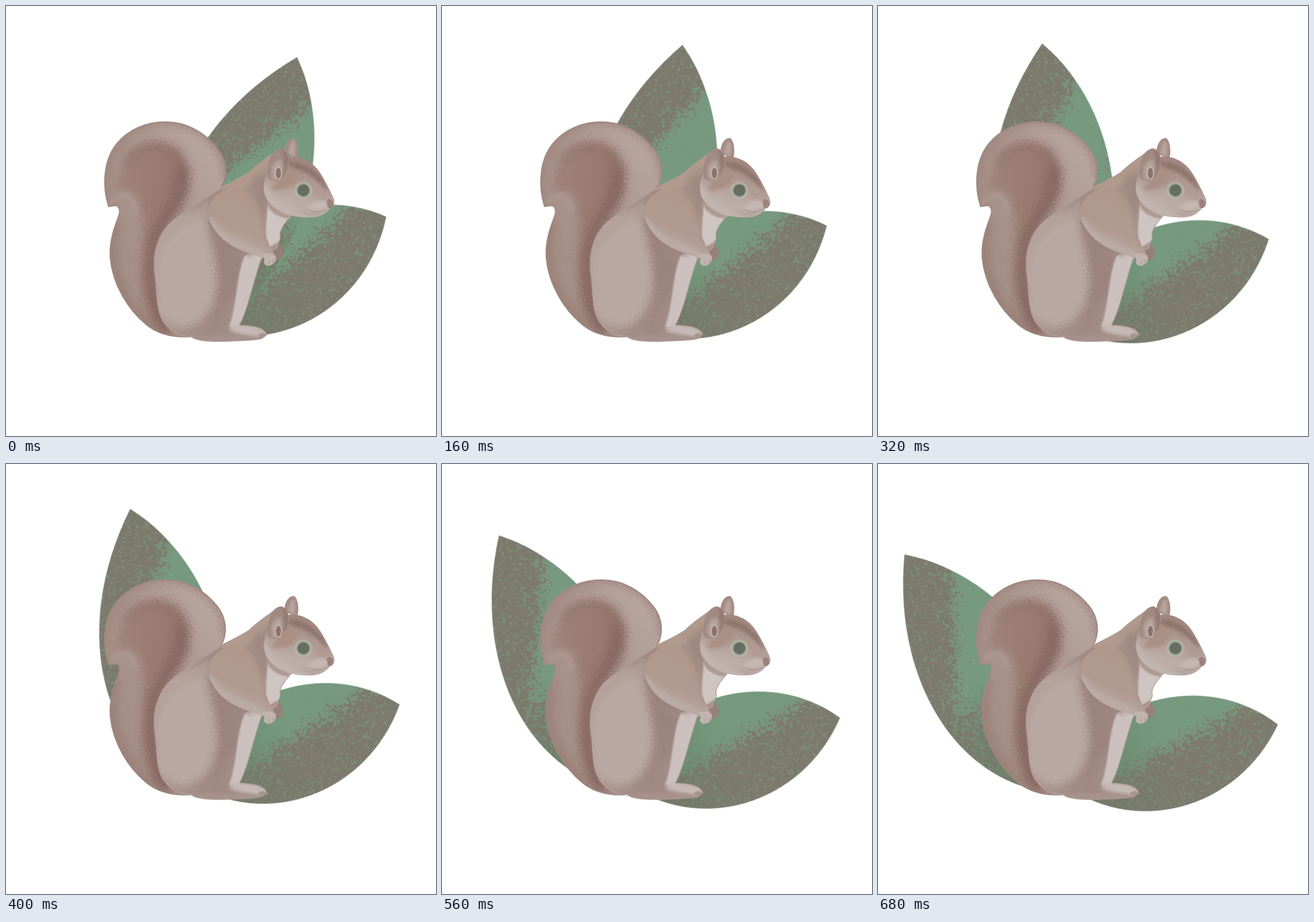
Write an HTML page with a canvas that moves like this. It is 700 px wide and 700 px high and loops after 1920 ms.

```html
<!DOCTYPE html>
<html lang="en">
<head>
<meta charset="utf-8">
<title>Squirrel and leaves</title>
<style>
  html, body { margin: 0; width: 100%; height: 100%; overflow: hidden; background: #fff; }
  #stage { position: relative; width: 700px; height: 700px; overflow: hidden; }
  canvas, svg { position: absolute; will-change: transform; }
  svg { left: 0; top: 0; }
  .edge { stroke-width: 2.4; stroke-linejoin: round; }
</style>
</head>
<body>
<div id="stage">
<svg width="700" height="700" viewBox="0 0 700 700">
  <defs>
    <!-- blur, then scatter the soft edge into stipple -->
    <filter id="grain" filterUnits="userSpaceOnUse" x="130" y="160" width="440" height="420" color-interpolation-filters="sRGB">
      <feGaussianBlur stdDeviation="6" result="b"/>
      <feTurbulence type="fractalNoise" baseFrequency=".6" numOctaves="2" seed="4"/>
      <feDisplacementMap in="b" scale="34" xChannelSelector="R" yChannelSelector="G"/>
    </filter>
    <filter id="fine" filterUnits="userSpaceOnUse" x="130" y="160" width="440" height="420" color-interpolation-filters="sRGB">
      <feGaussianBlur stdDeviation="2.5" result="b"/>
      <feTurbulence type="fractalNoise" baseFrequency=".6" numOctaves="2" seed="9"/>
      <feDisplacementMap in="b" scale="9" xChannelSelector="R" yChannelSelector="G"/>
    </filter>
    <filter id="soft" filterUnits="userSpaceOnUse" x="130" y="160" width="440" height="420">
      <feGaussianBlur stdDeviation=".8"/>
    </filter>
    <linearGradient id="tailFill" gradientUnits="userSpaceOnUse" x1="165" y1="350" x2="345" y2="240">
      <stop offset="0" stop-color="#a58f87"/><stop offset=".55" stop-color="#ac978f"/><stop offset="1" stop-color="#b8a7a0"/>
    </linearGradient>
    <linearGradient id="coreFill" gradientUnits="userSpaceOnUse" x1="195" y1="290" x2="300" y2="310">
      <stop offset="0" stop-color="#9d8077"/><stop offset=".55" stop-color="#997a71"/><stop offset="1" stop-color="#896b65"/>
    </linearGradient>
    <linearGradient id="bodyFill" gradientUnits="userSpaceOnUse" x1="270" y1="430" x2="400" y2="440">
      <stop offset="0" stop-color="#a8938c"/><stop offset=".6" stop-color="#9e8881"/><stop offset="1" stop-color="#a8938c"/>
    </linearGradient>
    <linearGradient id="armFill" gradientUnits="userSpaceOnUse" x1="385" y1="300" x2="350" y2="385">
      <stop offset="0" stop-color="#b0978a"/><stop offset=".65" stop-color="#b09a90"/><stop offset="1" stop-color="#b7a69f"/>
    </linearGradient>
    <linearGradient id="headFill" gradientUnits="userSpaceOnUse" x1="490" y1="252" x2="465" y2="343">
      <stop offset="0" stop-color="#a1877e"/><stop offset=".42" stop-color="#b19b92"/><stop offset=".75" stop-color="#bcaea8"/><stop offset="1" stop-color="#b9aaa5"/>
    </linearGradient>
    <path id="tail" d="M167 326C156 290 160 250 180 225C199 201 228 189 260 189C292 189 322 204 344 232C358 250 362 276 349 297L300 420V538C270 540 245 532 228 518C200 495 174 455 170 410C168 380 179 355 184 341C187 330 183 323 175 325Z"/>
    <path id="body" d="M446 233C425 247 407 260 396 271C380 282 366 287 350 296C318 319 283 338 264 357C246 377 240 405 242 430C248 470 243 490 256 513C268 530 284 538 302 538C312 546 345 546 365 545C390 544 408 543 416 541L424 535C419 524 405 521 379 520C393 495 400 455 415 411L440 394L446 377C443 366 452 354 464 341Z"/>
    <path id="arm" d="M331 326C340 302 365 292 388 298C405 308 414 331 418 356C420 372 427 383 430 392L437 405C429 412 417 411 405 405C380 398 352 386 337 360C329 346 328 336 331 326Z"/>
    <path id="head" d="M452 248C476 242 495 253 505 265C516 278 525 298 532 313C535 320 533 327 527 328C521 336 512 344 490 343C465 343 441 336 428 318C419 305 419 290 425 275C430 262 438 252 452 248Z"/>
    <path id="ear" d="M427 279C424 256 434 234 448 233C459 236 462 251 457 266C450 282 437 288 427 279Z"/>
    <clipPath id="inTail"><use href="#tail"/></clipPath>
    <clipPath id="inBody"><use href="#body"/></clipPath>
    <clipPath id="inArm"><use href="#arm"/></clipPath>
    <clipPath id="inHead"><use href="#head"/></clipPath>
    <clipPath id="inEar"><use href="#ear"/></clipPath>
  </defs>

  <!-- tail -->
  <use href="#tail" class="edge" fill="url(#tailFill)" stroke="#a28b83"/>
  <g clip-path="url(#inTail)">
    <path filter="url(#grain)" fill="none" stroke="#a0877f" stroke-width="14" d="M160 320C154 260 180 190 260 185C310 185 362 225 360 282"/>
    <path filter="url(#grain)" fill="none" stroke="#9b8279" stroke-width="22" d="M177 350C160 400 170 470 240 532"/>
    <path filter="url(#grain)" fill="url(#coreFill)" d="M182 305C180 255 205 222 250 221C288 224 303 258 296 300C290 328 268 344 256 366C242 400 240 470 268 540C226 516 218 460 222 410C225 360 225 335 211 306C204 298 190 298 182 305Z"/>
    <path filter="url(#grain)" fill="none" stroke="#886963" stroke-width="17" d="M286 262C294 310 258 340 243 378C228 430 238 480 262 530"/>
    <path filter="url(#grain)" fill="none" stroke="#8e716a" stroke-width="10" opacity=".75" d="M195 252C210 226 260 218 283 252"/>
    <path filter="url(#fine)" fill="none" stroke="#b2a098" stroke-width="10" opacity=".4" d="M172 319C190 300 208 308 212 336"/>
  </g>

  <!-- far paw -->
  <path fill="#978079" d="M432 390C440 380 450 391 451 402C450 412 445 415 438 414Z"/>

  <!-- body -->
  <use href="#body" class="edge" fill="url(#bodyFill)" stroke="#ae9a92"/>
  <g clip-path="url(#inBody)">
    <path filter="url(#fine)" fill="#b19a8d" d="M450 228L345 298L380 305L430 270Z"/>
    <path filter="url(#grain)" fill="#9e877f" d="M400 282L432 262L428 330L415 345Z"/>
    <path filter="url(#grain)" fill="#957d7680" d="M330 345C340 390 365 405 390 407L380 460L350 500C350 460 350 400 325 360Z"/>
    <path filter="url(#grain)" fill="#b8a8a1" d="M262 350C300 332 322 330 327 350C331 385 345 415 343 455C338 497 318 522 288 524C262 520 246 510 240 480C246 450 230 410 240 392Z"/>
    <path filter="url(#fine)" fill="#b2a098" opacity=".7" d="M242 390C260 350 300 338 330 316L330 345C290 350 255 380 243 430Z"/>
    <path filter="url(#soft)" fill="#cec4c1" d="M426 322C438 336 450 341 466 338L450 365L450 380L428 393C419 375 425 350 426 322Z"/>
    <path filter="url(#soft)" fill="#ad9990" d="M425 318C435 331 450 338 464 341L459 346C444 344 434 338 427 328Z"/>
    <path filter="url(#soft)" fill="#cbc0bd" d="M389 406C396 402 407 403 420 406C406 455 400 492 380 524L363 522C376 492 375 433 389 406Z"/>
    <path filter="url(#fine)" fill="#c5b9b5" d="M364 522C380 516 416 519 426 534L416 540C400 536 383 536 365 528Z"/>
    <path filter="url(#fine)" fill="#a6928c" d="M300 540C330 530 390 540 421 540L414 548H310Z"/>
  </g>
  <path fill="#a8948f" d="M412 534C417 531 422 533 424 536L415 541C411 540 410 537 412 534Z"/>

  <!-- arm -->
  <path filter="url(#fine)" fill="none" stroke="#8f766f" stroke-width="4" opacity=".5" d="M332 352C345 385 370 398 402 407"/>
  <use href="#arm" fill="url(#armFill)"/>
  <g clip-path="url(#inArm)">
    <path filter="url(#fine)" fill="none" stroke="#b9aaa4" stroke-width="16" d="M328 346C343 382 390 391 420 409"/>
    <path filter="url(#fine)" fill="none" stroke="#a38a80" stroke-width="6" opacity=".45" d="M391 298C413 315 416 350 430 390"/>
  </g>
  <path fill="#c1b4af" d="M417 406C422 401 434 402 439 407C441 414 437 421 428 423C421 423 418 418 421 412Z"/>
  <path fill="none" stroke="#aa9791" stroke-width="1" d="M430 414L427 421M436 412L434 419"/>

  <!-- far ear -->
  <path class="edge" fill="#a58d85" stroke="#a58d85" d="M454 239C455 224 461 216 469 216C475 222 476 238 473 248Z"/>
  <path filter="url(#soft)" fill="#b4a29b" d="M460 240C460 229 464 221 469 220C472 229 471 239 469 246Z"/>

  <!-- head -->
  <use href="#head" class="edge" fill="url(#headFill)" stroke="url(#headFill)"/>
  <g clip-path="url(#inHead)">
    <path filter="url(#fine)" fill="#8d746c" d="M456 254C480 251 500 264 514 280L524 302C508 290 500 275 484 269C471 264 463 263 456 254Z"/>
    <path filter="url(#fine)" fill="#a98f84" d="M454 267C474 264 480 278 468 290C456 300 440 302 432 298Z"/>
    <path filter="url(#fine)" fill="#c0b4af" d="M420 284C430 310 448 326 478 329C487 338 500 343 490 350C450 350 420 330 415 300Z"/>
    <path filter="url(#fine)" fill="#b09a91" d="M497 280C512 290 522 303 525 315L505 315Z"/>
    <path filter="url(#fine)" fill="#c4b8b3" d="M497 322C508 314 522 315 524 324C522 331 511 333 499 333C488 337 489 330 497 322Z"/>
    <path filter="url(#fine)" fill="#a68f87" opacity=".4" d="M465 328C480 334 497 339 514 334L510 340C490 342 475 338 465 328Z"/>
  </g>
  <path fill="none" stroke="#a48e87" stroke-width="1.2" d="M522 331C513 336 502 336 492 331"/>
  <path fill="#9b827b" d="M522 318C525 312 530 313 533 321C533 328 528 331 524 328Z"/>
  <circle cx="484" cy="300" r="13.6" fill="#b9b9ad" filter="url(#soft)"/>
  <circle cx="484" cy="300" r="11.4" fill="#8ea48f"/>
  <circle cx="484.3" cy="300" r="9.6" fill="#686d61"/>

  <!-- near ear -->
  <use href="#ear" class="edge" fill="#a18a81" stroke="#a18a81"/>
  <g clip-path="url(#inEar)">
    <path filter="url(#fine)" fill="#8e756e" d="M448 230C465 235 462 260 453 278C453 260 456 244 448 230Z"/>
    <path filter="url(#fine)" fill="#b8a69e" d="M434 280C430 263 436 252 447 251C453 261 449 279 439 284Z"/>
  </g>
  <ellipse cx="443.5" cy="272" rx="6" ry="10.5" fill="#c4b8b2"/>
  <ellipse cx="443.5" cy="272" rx="4.2" ry="8.7" fill="#8c716b"/>
</svg>
</div>
<script>
const GREEN = [119, 154, 127], DEEP = [103, 136, 108], BROWN = [125, 122, 109], MOSS = [115, 121, 104];

const mix = (a, b, t) => a + (b - a) * t;
const smooth = (lo, hi, x) => {
  const t = Math.min(1, Math.max(0, (x - lo) / (hi - lo)));
  return t * t * (3 - 2 * t);
};
const hash = (x, y) => {
  let h = Math.imul(x + 57, 374761393) ^ Math.imul(y + 131, 668265263);
  h = Math.imul(h ^ h >>> 13, 1274126177);
  return ((h ^ h >>> 16) >>> 0) / 2 ** 32;
};
const noise = (x, y) => {
  const i = Math.floor(x), j = Math.floor(y), u = smooth(0, 1, x - i), v = smooth(0, 1, y - j);
  return mix(mix(hash(i, j), hash(i + 1, j), u), mix(hash(i, j + 1), hash(i + 1, j + 1), u), v);
};

// Leaf stands upright: tip at the top centre, pivot at the bottom centre.
function makeLeaf({ x, y, len, outline, light, from, to }) {
  const half = 125, el = document.createElement('canvas'), g = el.getContext('2d');
  el.width = half * 2;
  el.height = len;
  const img = g.createImageData(el.width, len);
  for (let row = 0, i = 0; row < len; row++) {
    const low = smooth(.45, .9, row / len);
    for (let col = 0; col < el.width; col++, i += 4) {
      const speck = noise(col / 3.1, row / 3.1) * .8 + noise(col / 1.4 + 90, row / 1.4) * .2;
      const glow = light(col - half, row);
      const level = .28 + .07 * low + .6 * glow;
      const lit = (.7 + .3 * glow) * smooth(-.07, .07, level - speck);
      const wash = low * (.6 + .4 * hash(col, row));
      for (let c = 0; c < 3; c++)
        img.data[i + c] = mix(mix(BROWN[c], MOSS[c], wash), mix(GREEN[c], DEEP[c], low), lit);
      img.data[i + 3] = 255;
    }
  }
  g.putImageData(img, 0, 0);
  g.globalCompositeOperation = 'destination-in';
  g.translate(half, len);
  g.fill(new Path2D(outline));
  el.style.cssText = `left:${x - half}px;top:${y - len}px;transform-origin:50% 100%`;
  stage.insertBefore(el, stage.querySelector('svg'));
  return p => { el.style.transform = `rotate(${mix(from, to, p)}deg)`; };
}

const stage = document.getElementById('stage');
const leaves = [
  makeLeaf({
    x: 297, y: 517, len: 366, from: 61.61, to: 75.29,
    outline: 'M0-366C-118-276-118-90 0 0C119-90 119-267 0-366Z',
    light: (v, u) => smooth(-38, 16, (-v - 28) * .972 + (u - 150) * .233)
  }),
  makeLeaf({
    x: 321.4, y: 535, len: 477, from: 18.7, to: -35.63,
    outline: 'M0-477C118-353 118-130 0 0C-147-91-147-308 0-477Z',
    light: (v, u) => smooth(-32, 16, (v - 18) * .822 + (u - 127) * .569) * (1 - .8 * smooth(235, 300, u)) * (1 - .25 * smooth(66, 88, v))
  })
];

// The swing advances in 17 steps of 40 ms, then rests.
const LOOP = 1920, STEP = 40, STEPS = 17;
function draw() {
  const t = performance.now() % LOOP;
  const x = Math.min(STEPS, Math.floor(t / STEP)) / STEPS;
  const p = x * (.5 + x * (1.5 - x));
  leaves.forEach(turn => turn(p));
  requestAnimationFrame(draw);
}
draw();
</script>
</body>
</html>
```
